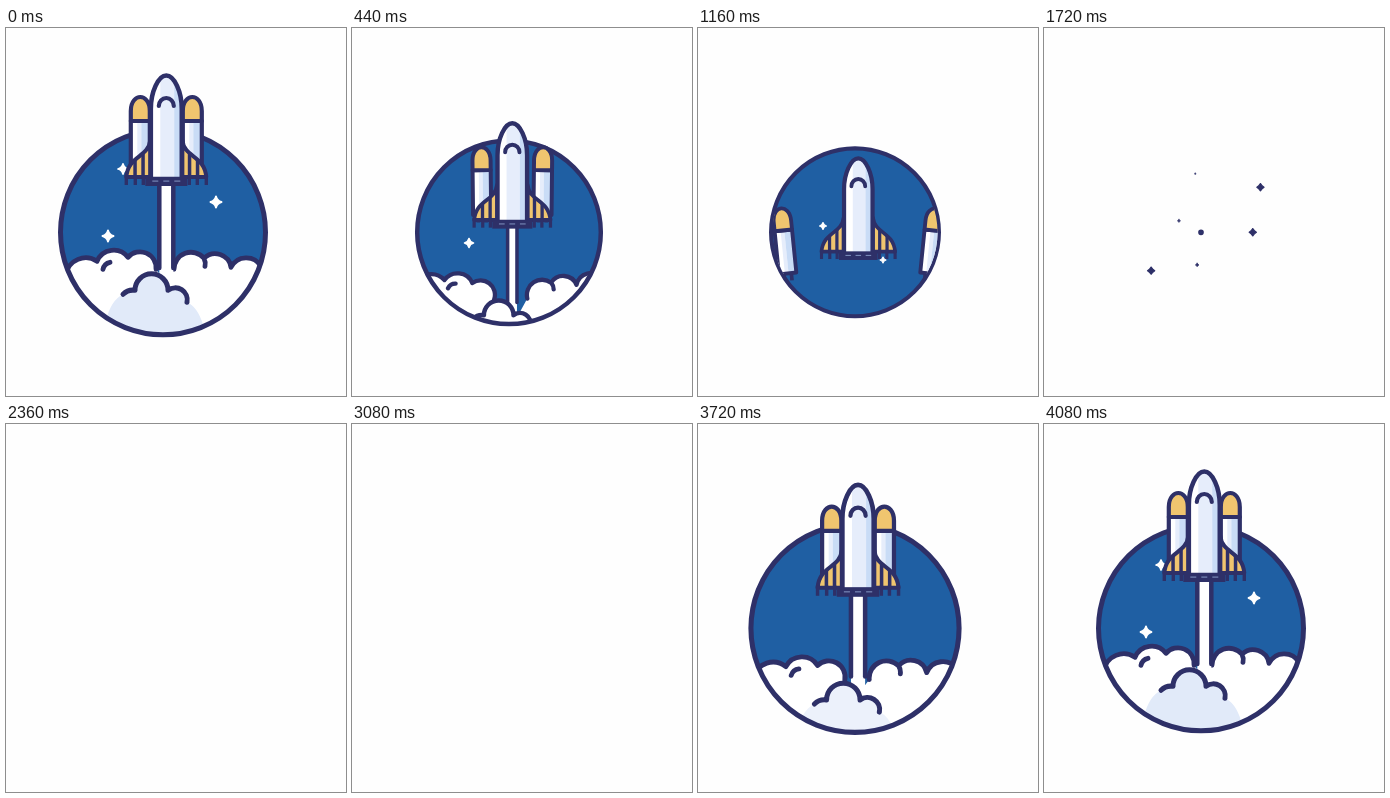
An HTML page with a canvas that plays this animation: 340x368 px, repeating every 4120 ms.

```html
<!DOCTYPE html>
<html lang="en">
<head>
<meta charset="utf-8">
<title>Shuttle launch</title>
<style>
  html, body { margin: 0; width: 100%; height: 100%; overflow: hidden; background: #fff; }
  canvas { display: block; }
</style>
</head>
<body>
<canvas id="stage" width="340" height="368"></canvas>
<script>
const ctx = document.getElementById('stage').getContext('2d');
const LOOP = 4120, STEP = 40, CX = 157, CY = 204.3, FULL = 105;
const CLOSE = 1160, CLOSED = 1730, OPEN = 3080, OPENED = 4080, BURST = 1480, BURST_END = 2360;
const NAVY = '#2e3068', BLUE = '#1f5fa3', WHITE = '#fff', GOLD = '#f0c56f',
      PALE = '#e6edfb', SHADE = '#c9dcf6', MIST = '#e1eaf9';

const clamp = v => Math.max(0, Math.min(1, v));
const progress = (t, from, to) => clamp((t - from) / (to - from));
const easeOut = (u, power) => 1 - (1 - u) ** power;
const backOut = u => 1 + 1.9 * (u - 1) ** 3 + 0.9 * (u - 1) ** 2;

// Where everything is while the shuttle climbs out of shot and the disk closes.
function descent(t) {
  const sink = easeOut(progress(t, 0, CLOSE), 1.8);
  const shrink = 1 - progress(t, CLOSE, CLOSED) ** 1.9;
  const u = t / CLOSE, apart = u ** 2.27, drop = 150 * u * u;
  return {
    radius: FULL * (1 - 0.181 * sink) * shrink,
    x: CX + 3.3 * shrink,
    y: CY + (45 + 83 * sink - CY) * shrink,
    scale: (1 - 0.08 * sink) * shrink,
    apart, drop,
    plume: 7 * (1 - drop / 65)
  };
}

// The disk pops open and the shuttle rises with a slight overshoot.
function ascent(t) {
  const grow = backOut(progress(t, OPEN, OPENED) ** 1.26);
  const lift = backOut(progress(t, OPEN + 160, OPENED) ** 1.6);
  const scale = 0.2 + 0.8 * grow;
  return {
    radius: FULL * grow,
    x: CX + 3.3 * lift,
    y: 45 + 171 * (1 - lift),
    scale,
    apart: 0,
    drop: 100 * (1 - lift),
    plume: 7 * scale
  };
}

function cloud(edge, close, ticks = '') {
  return { fill: new Path2D(edge + close), line: new Path2D(edge + ticks) };
}
const leftCloud = cloud('M-97 42A20 20 0 0 1-66 29A18 18 0 0 1-35 25A16 16 0 0 1-7 37',
  'L10 60V130H-125V42Z', 'M-60 37A9 9 0 0 1-53 30');
const rightCloud = cloud('M11 37A17 17 0 0 1 41 26A16 16 0 0 1 68 35A17 17 0 0 1 98 34',
  'H125V130H-10V60Z', 'M41 26A12 12 0 0 1 42 34');
const frontCloud = cloud('M-40 62A14 14 0 0 1-28 58A16.5 16.5 0 0 1 5 58A12 12 0 0 1 24 70',
  'Q34 74 40 92V120H-60L-57 88Q-52 68-40 62Z');

const BODY = new Path2D('M-15.5 106V36C-15.5 19-8 2.5 0 2.5C8 2.5 15.5 19 15.5 36V106Z');
const WINDOW = new Path2D('M-7.5 33A7.5 8 0 0 1 7.5 33');
const WING = new Path2D('M-16 67C-18 85-38 82-40 104H-16Z');
const CAP = new Path2D('M-9.5 25V15C-9.5 5-4 1 0 1C4 1 9.5 5 9.5 15V25Z');
const TUBE = new Path2D('M-9.5 25H9.5V72H-9.5Z');

// x, y, size, moment of full brightness
const stars = [
  [210, 174, 5.5, 0], [102, 208, 5.5, 0], [117, 141, 5, 0],
  [117, 215, 4.5, 440], [125, 198, 3.5, CLOSE], [185, 232, 3, CLOSE]
];
// direction and size of the pieces thrown out when the disk closes
const sparks = [
  [62, -47, 3.6], [54, 0, 3.6], [-52, 40, 3.6], [-23, -12, 1.6], [-4, 34, 1.8], [-6, -61, 1]
];

function paint(path, fill, width) {
  if (fill) { ctx.fillStyle = fill; ctx.fill(path); }
  if (width) { ctx.lineWidth = width; ctx.strokeStyle = NAVY; ctx.stroke(path); }
}

function bar(x, y, w, h, color) {
  ctx.fillStyle = color;
  ctx.fillRect(x, y, w, h);
}

function group(draw) {
  ctx.save();
  draw();
  ctx.restore();
}

function star(x, y, r, color, waist) {
  if (r < 0.2) return;
  const c = r * waist;
  ctx.beginPath();
  ctx.moveTo(x, y - r);
  ctx.quadraticCurveTo(x + c, y - c, x + r, y);
  ctx.quadraticCurveTo(x + c, y + c, x, y + r);
  ctx.quadraticCurveTo(x - c, y + c, x - r, y);
  ctx.quadraticCurveTo(x - c, y - c, x, y - r);
  ctx.fillStyle = ctx.strokeStyle = color;
  ctx.lineWidth = r * 0.35;
  ctx.fill();
  ctx.stroke();
}

function drawStars(t) {
  for (const [x, y, size, peak] of stars) {
    const away = (t - peak + 1.5 * LOOP) % LOOP - LOOP / 2;
    if (Math.abs(away) < 400) star(x, y, size * Math.cos(Math.PI * away / 800), WHITE, 0.2);
  }
}

function drawSideCloud(shape, side, drop) {
  const turn = Math.min(0.3, drop * 0.011);
  group(() => {
    ctx.translate(-side * (78 + turn * 20), 25 + drop);
    ctx.rotate(side * turn);
    ctx.translate(side * 78, -25);
    paint(shape.fill, WHITE);
    paint(shape.line, null, 4.8);
  });
}

function drawFrontCloud(drop) {
  ctx.translate(0, drop * 1.6);
  bar(-60, 74, 120, 60, WHITE);
  paint(frontCloud.fill, WHITE);
  group(() => {
    ctx.globalAlpha = clamp(1 - drop / 22);
    paint(frontCloud.fill, MIST);
  });
  paint(frontCloud.line, null, 5);
}

function drawPlume({ x, y, scale, plume, drop }) {
  if (plume < 0.5) return;
  const top = y + 108 * scale, end = 240 + drop * 1.6;
  bar(x - plume, top, plume * 2, 330 - top, WHITE);
  if (end <= top) return;
  for (const side of [x - plume, x + plume]) {
    paint(new Path2D(`M${side} ${top}V${end}`), null, Math.min(4.5, plume * 0.75));
  }
}

function drawDisk(t, pose) {
  const k = pose.radius / FULL, line = Math.min(pose.radius, Math.max(2.5, 5 * k));
  const disk = new Path2D();
  disk.arc(CX, CY, pose.radius - line / 2, 0, 7);
  paint(disk, BLUE);
  const inClouds = draw => group(() => {
    ctx.translate(CX, CY);
    ctx.scale(k, k);
    draw();
  });
  group(() => {
    ctx.clip(disk);
    drawStars(t);
    inClouds(() => {
      drawSideCloud(leftCloud, 1, pose.drop);
      drawSideCloud(rightCloud, -1, pose.drop);
    });
    drawPlume(pose);
    inClouds(() => drawFrontCloud(pose.drop));
  });
  paint(disk, null, line);
}

function drawBooster(side, apart) {
  group(() => {
    ctx.translate(side * (26 + 58 * apart), 23 + 33 * apart);
    ctx.rotate(side * 0.1 * apart);
    for (const x of [-6, 2]) bar(x, 72, 4, 8, NAVY);
    paint(TUBE, WHITE);
    bar(-3, 25, 4, 47, PALE);
    bar(1, 25, 8.5, 47, SHADE);
    paint(TUBE, null, 4.2);
    paint(CAP, GOLD, 4.2);
  });
}

function drawWing(side) {
  group(() => {
    ctx.scale(side, 1);
    paint(WING, GOLD);
    group(() => {
      ctx.clip(WING);
      for (const x of [-33, -25]) bar(x, 80, 3.5, 26, NAVY);
    });
    paint(WING, null, 4);
    for (const x of [-40, -31, -23]) bar(x - 1.7, 102, 3.4, 10, NAVY);
  });
}

function drawBody() {
  paint(BODY, WHITE);
  group(() => {
    ctx.clip(BODY);
    bar(-6, 0, 22, 110, PALE);
    bar(8, 0, 8, 110, SHADE);
  });
  paint(BODY, null, 4.6);
  paint(WINDOW, null, 4.2);
  bar(-21, 104, 42, 9, NAVY);
  for (let x = -14; x < 14; x += 11) bar(x, 107.5, 6, 1.2, '#7686b5');
}

function drawShip({ radius, x, y, scale, apart }) {
  group(() => {
    // The nose may leave the disk through the top; everything else stays inside it.
    const visible = new Path2D();
    visible.arc(CX, CY, radius * 0.96, 0, 7);
    visible.rect(100, 0, 120, CY);
    ctx.clip(visible);
    ctx.translate(x, y);
    ctx.scale(scale, scale);
    for (const side of [-1, 1]) drawBooster(side, apart);
    for (const side of [-1, 1]) drawWing(side);
    drawBody();
  });
}

function drawSparks(t) {
  if (t < BURST || t >= BURST_END) return;
  const travel = 1.88 * easeOut(progress(t, BURST, BURST + 800), 2);
  const fade = clamp((BURST_END - t) / 140);
  for (const [dx, dy, size] of sparks) {
    const grown = Math.min(3.6, size + Math.max(0, t - 1720) / 60);
    const grow = progress(t, 1720 - size * 50, 1720);
    star(CX + dx * travel, CY + dy * travel, grown * grow * fade, NAVY, 0.4);
  }
}

function render(t) {
  bar(0, 0, 340, 368, '#fefefe');
  ctx.lineCap = ctx.lineJoin = 'round';
  if (t < CLOSED || t > OPEN) {
    const pose = t < CLOSED ? descent(t) : ascent(t);
    if (pose.radius > 0.5) drawDisk(t, pose);
    if (pose.radius > 6) drawShip(pose);
  }
  drawSparks(t);
}

const start = performance.now();
function tick() {
  const t = (performance.now() - start) % LOOP;
  render(Math.floor(t / STEP) * STEP);
  requestAnimationFrame(tick);
}
tick();
</script>
</body>
</html>
```
